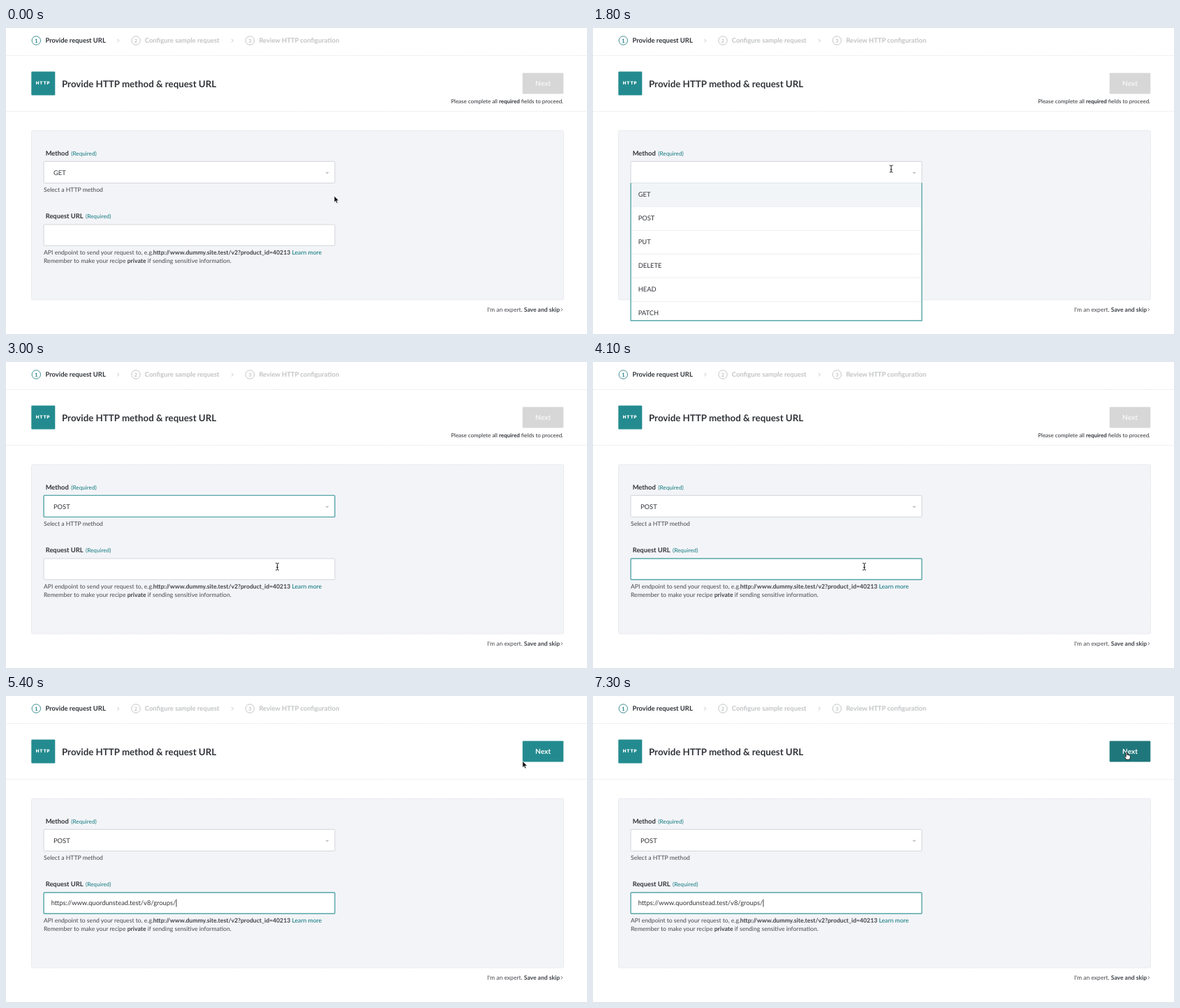
Recreate the animation shown at these times as an HTML page. Size 832 by 439 pixels, loop 7400 ms.

```html
<!DOCTYPE html>
<html lang="en">
<head>
<meta charset="utf-8">
<title>Request setup</title>
<style>
  html, body { margin: 0; width: 100%; height: 100%; overflow: hidden; background: #fff; }
  svg { display: block; width: 100vw; height: 100vh; }
  text { font-family: Lato, sans-serif; font-size: 9.35px; fill: #303338; text-rendering: geometricPrecision; }
  .bold, tspan { font-weight: 700; }
  .step { font-size: 9.41px; }
  .title { font-size: 13.31px; font-weight: 700; }
  .hint { font-size: 8.65px; fill: #45484d; }
  .hint tspan { fill: #3f4247; }
  .skip { font-size: 8.54px; }
  .small { font-size: 7.98px; }
  .required { font-size: 8.2px; }
  .teal, .hint .teal { fill: #147b7f; }
  .hint .teal { font-weight: 500; }
  .muted { fill: #c1c3c5; }
  .digit { font-size: 7.4px; font-weight: 700; text-anchor: middle; }
  .next { font-size: 10.05px; font-weight: 700; text-anchor: middle; }
  .icon { font: 900 6.2px Inter, sans-serif; letter-spacing: .9px; fill: #fff; }
  .line { fill: none; stroke: #c3c5c7; }
  .rule { stroke: #e9eaec; stroke-dasharray: 2 1; }
  .field { fill: #fff; stroke: #d3d6da; }
  .focus { stroke: #55a6a9; stroke-width: 1.4; }
  .cursor path { stroke-linejoin: round; stroke-linecap: round; }
</style>
</head>
<body>
<svg viewBox="0 0 832 439" preserveAspectRatio="none">
  <g id="steps"></g>
  <path class="rule" d="M0 39.5H832M0 119.5H832"/>

  <rect x="36.3" y="62.5" width="34" height="34" rx="1" fill="#238b8f"/>
  <text class="icon" x="42.7" y="81.3">HTTP</text>
  <text class="title" x="80" y="84.6">Provide HTTP method &amp; request URL</text>
  <rect id="button" x="739.7" y="64.6" width="58.6" height="30" rx="1"/>
  <text id="next" class="next" x="769" y="83.1">Next</text>
  <text id="notice" class="small" x="798" y="108" text-anchor="end">Please complete all <tspan>required</tspan> fields to proceed.</text>

  <rect x="36.5" y="147" width="762" height="243" rx="2" fill="#f3f4f8" stroke="#e2e4e8" stroke-dasharray="2 1"/>
  <text class="bold" x="56.7" y="182.6">Method</text>
  <text class="required teal" x="93.3" y="182.6">(Required)</text>
  <rect id="method" class="field" x="54.1" y="191.4" width="416.8" height="31" rx="1"/>
  <text id="methodText" x="68" y="210.5"></text>
  <path d="M457.3 206.7h5.4l-2.7 2.8z" fill="#c0c3c7"/>
  <text class="hint" x="54" y="235">Select a HTTP method</text>

  <text class="bold" x="56.7" y="272.9">Request URL</text>
  <text class="required teal" x="114" y="272.9">(Required)</text>
  <rect id="url" class="field" x="54.1" y="282" width="416.8" height="30.2" rx="1"/>
  <text id="urlText" x="64.7" y="300.2"></text>
  <rect id="caret" y="291.5" width=".9" height="11" fill="#333"/>
  <text class="hint" x="54" y="325">API endpoint to send your request to, e.g. <tspan x="210.8">http://www.dummy.site.test/v2?product_id=40213</tspan> <tspan x="409.4" class="teal">Learn more</tspan></text>
  <text class="hint" x="54" y="337">Remember to make your recipe <tspan>private</tspan> if sending sensitive information.</text>

  <text class="hint skip" x="793" y="407" text-anchor="end">I'm an expert. <tspan>Save and skip</tspan></text>
  <path class="line" d="M794.8 402l2.1 2.1-2.1 2.1" style="stroke:#55585d;stroke-width:.8"/>

  <g id="list"></g>

  <g id="arrow" class="cursor">
    <path d="M0 0V9.2L2.1 7.3 3.6 10.6 5.2 9.9 3.8 6.7H6.6Z" fill="#111" stroke="#fff" stroke-width=".7"/>
  </g>
  <g id="beam" class="cursor">
    <path d="M-2-5Q0-5 0-3.8Q0-5 2-5M0-3.8V3.8M-2 5Q0 5 0 3.8Q0 5 2 5M-1 1H1" fill="none" stroke="#222"/>
  </g>
  <g id="hand" class="cursor">
    <path d="M-.9 6V.7Q0-.7 1 .7V4.2Q2-.1 2.6 4.4 3.6 3.6 4.1 4.9 5.4 4.4 5.4 6V8.2L4.4 10.7H-.2L-3 6.8Q-2.8 5.2-.9 6.7Z" fill="#fff" stroke="#151515" stroke-width=".9"/>
  </g>
</svg>
<script>
const LOOP = 7400;
const OPEN = 1800, PICK = 2600, FOCUS_URL = 3400, PASTE = 4400;
const ADDRESS = "https://www.quordunstead.test/v8/groups/";
const $ = id => document.getElementById(id);

const steps = [
  [43.3, 56.5, "Provide request URL"],
  [186, 198.8, "Configure sample request"],
  [349.3, 362.4, "Review HTTP configuration"]
];
$("steps").innerHTML = steps.map(([cx, x, label], i) => `
  <circle class="line" cx="${cx}" cy="18" r="6.2" ${i ? "" : 'style="stroke:#3f8f93"'}/>
  <text class="digit ${i ? "muted" : "teal"}" x="${cx}" y="20.7">${i + 1}</text>
  <text class="bold step ${i ? "muted" : ""}" x="${x}" y="21.4">${label}</text>`).join("") +
  [159.3, 323].map(x => `<path class="line" d="M${x} 15.7l2.4 2.4-2.4 2.4"/>`).join("");

const ROW = 34, LIST_TOP = 222;
const options = ["GET", "POST", "PUT", "DELETE", "HEAD", "PATCH"];
$("list").innerHTML =
  `<rect x="54.1" y="222" width="416.8" height="197.5" fill="#fff"/>
   <rect id="highlight" x="54.1" width="416.8" height="34" fill="#f2f5f8"/>` +
  options.map((name, i) => {
    const y = LIST_TOP + i * ROW;
    return `<text x="64.7" y="${y + 20.4}">${name}</text>` +
      (i ? `<path d="M55 ${y + .3}H470" stroke="#eceef1"/>` : "");
  }).join("") +
  `<path d="M54.1 222V419.7H470.9V222" fill="none" class="focus"/>
   <path d="M54.5 222.3H470.5" stroke="#dfe4e7"/>`;

// Pointer stops: time, x, y
const stops = [
  [1000, 470, 241], [1500, 427, 202],
  [1800, 427, 202], [2300, 400, 273],
  [2600, 400, 273], [3000, 388.5, 293.5],
  [4500, 388.5, 293.5], [4800, 436, 256],
  [4900, 436, 256], [5500, 764, 80.5]
];

function pointerAt(t) {
  let from = stops[0];
  for (const to of stops) {
    if (t < to[0]) {
      const p = Math.max(0, (t - from[0]) / (to[0] - from[0] || 1));
      const e = p * p * (3 - 2 * p);
      return [from[1] + (to[1] - from[1]) * e, from[2] + (to[2] - from[2]) * e];
    }
    from = to;
  }
  return from.slice(1);
}

const show = (id, on) => $(id).setAttribute("visibility", on ? "visible" : "hidden");
const inside = (x, y, l, t, r, b) => x >= l && x <= r && y >= t && y <= b;

function draw(now) {
  const t = Math.floor(now % LOOP / 100) * 100;
  const open = t >= OPEN && t < PICK;
  const ready = t >= PASTE;
  const urlFocus = t >= FOCUS_URL;
  const [x, y] = pointerAt(t);
  const overNext = inside(x, y, 740, 65, 798, 94);
  const overList = open && inside(x, y, 54, LIST_TOP, 471, 420);
  const overField = inside(x, y, 54, 191, 471, 222) || inside(x, y, 54, 282, 471, 312);

  $("methodText").textContent = open ? "" : t < OPEN ? "GET" : "POST";
  $("method").classList.toggle("focus", t >= PICK && !urlFocus);
  $("url").classList.toggle("focus", urlFocus);
  $("urlText").textContent = ready ? ADDRESS : "";
  $("caret").setAttribute("x", 64.9 + (ready ? $("urlText").getComputedTextLength() : 0));
  show("caret", urlFocus && (t + 850) % 1000 < 500);

  $("list").style.display = open ? "" : "none";
  $("highlight").setAttribute("y", LIST_TOP + (overList ? Math.floor((y - LIST_TOP) / ROW) * ROW : 0));

  $("button").setAttribute("fill", !ready ? "#d7d7d7" : overNext ? "#1f777b" : "#238b8f");
  $("next").style.fill = ready ? "#fff" : "#f5f5f5";
  show("notice", !ready);

  const kind = overNext || overList ? "hand" : overField ? "beam" : "arrow";
  for (const id of ["arrow", "beam", "hand"]) {
    show(id, id === kind);
    $(id).setAttribute("transform", `translate(${x} ${y})`);
  }
}

const start = performance.now();
function tick() {
  draw(performance.now() - start);
  requestAnimationFrame(tick);
}
tick();
</script>
</body>
</html>
```
